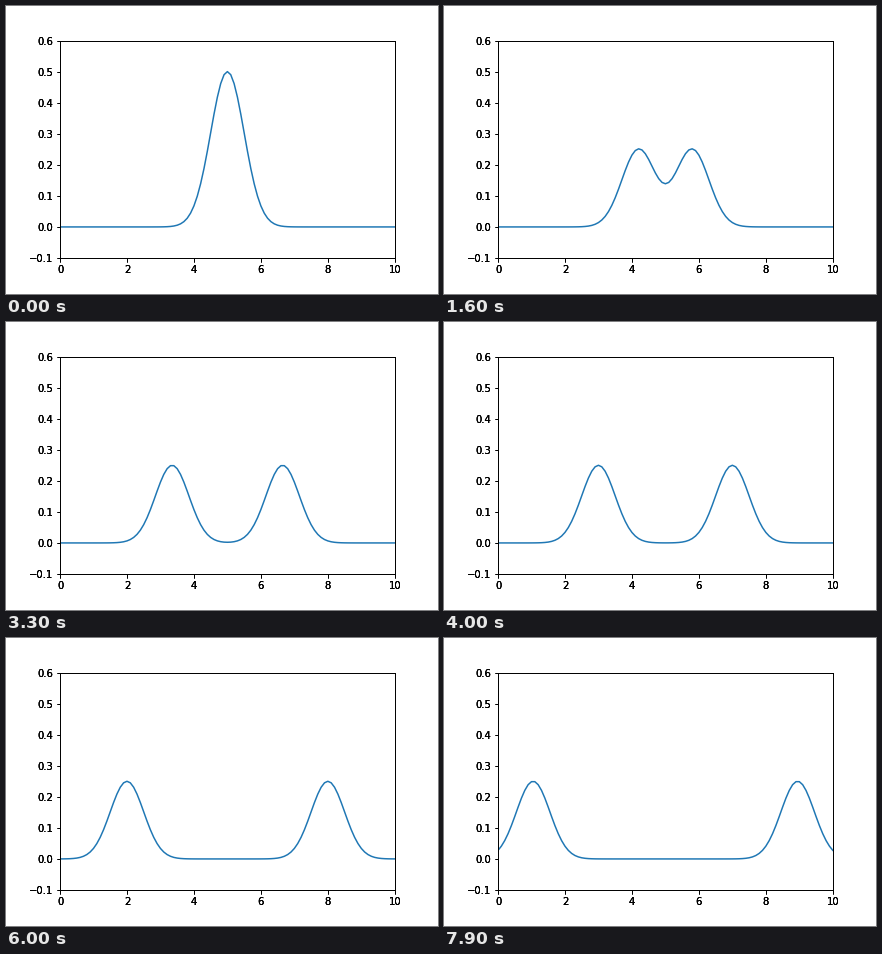
These frames come from a looping animation (432 px wide and 288 px high, 8000 ms). A matplotlib script:

```python
import numpy as np
import matplotlib.pyplot as plt
from matplotlib.animation import FuncAnimation

FRAMES = 80
INTERVAL = 100   # ms
STEP = 0.05      # distance each pulse travels per frame
CENTER = 5.0
LAYERS = 3       # overlaid axes give the labels their heavy, dark edges

plt.rcParams.update({"font.family": "DejaVu Sans", "font.size": 10})


def pulse(x):
    return 0.5 * np.exp(-2 * (x - CENTER) ** 2)


def wave(x, shift):
    """Initial pulse split into two halves moving apart."""
    return 0.5 * (pulse(x - shift) + pulse(x + shift))


def add_axes(fig, face):
    ax = fig.add_axes([0.125, 0.125, 0.775, 0.755], facecolor=face)
    ax.set(xlim=(0, 10), ylim=(-0.1, 0.6),
           xticks=np.arange(0, 11, 2), yticks=np.arange(-1, 7) / 10)
    return ax


fig = plt.figure(figsize=(6, 4), dpi=72, facecolor="white")
ax = add_axes(fig, "white")
for _ in range(LAYERS - 1):
    add_axes(fig, "none")

x = np.linspace(0, 10, 101)
line, = ax.plot(x, wave(x, 0), color="#1f77b4", lw=1.5)


def update(i):
    line.set_ydata(wave(x, STEP * i))
    return line,


anim = FuncAnimation(fig, update, frames=FRAMES, interval=INTERVAL,
                     repeat=True, repeat_delay=0, blit=False)
plt.show()
```
